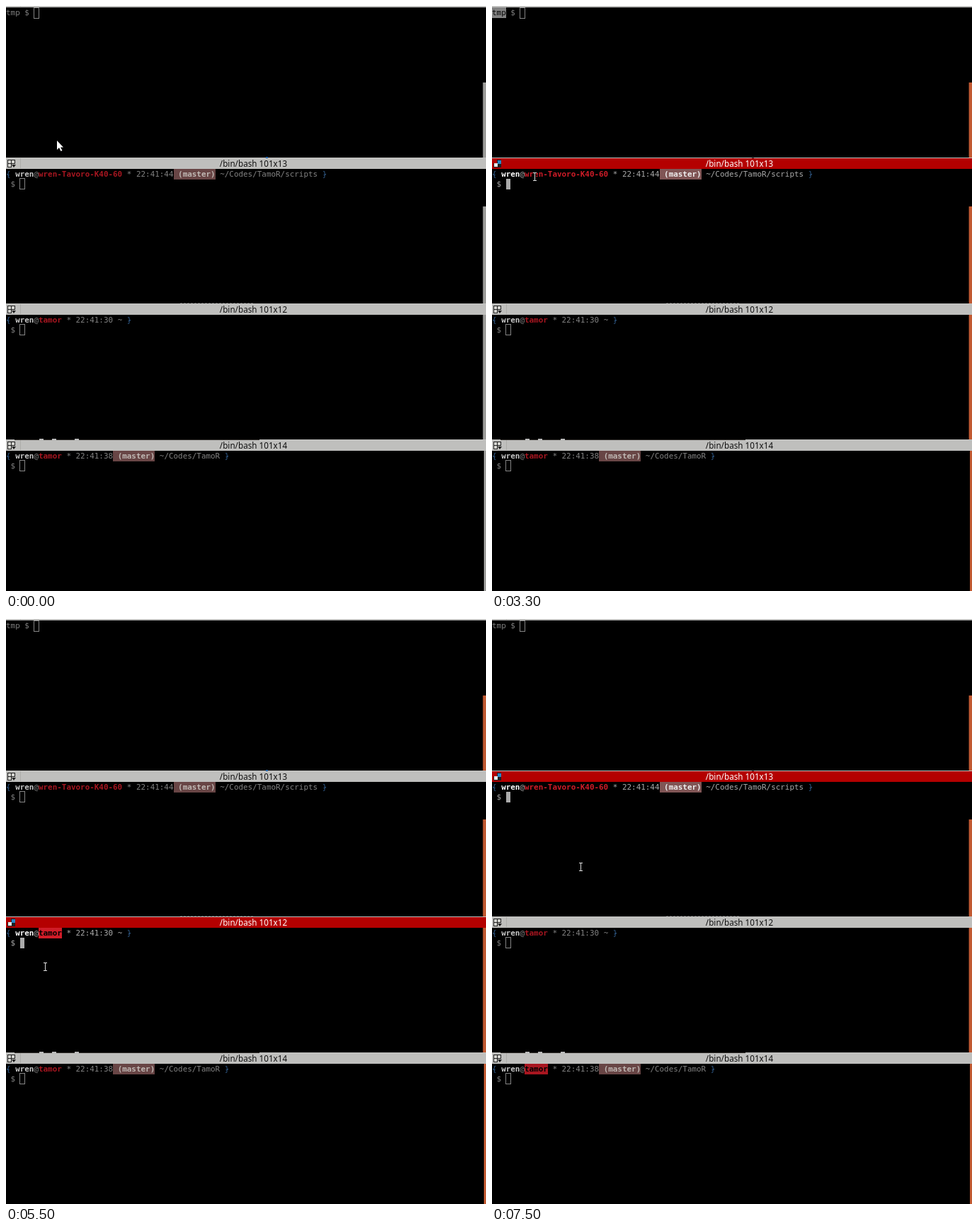
Animation of 678 by 826 pixels, one loop 8 s. Source, as an HTML page with a canvas:

```html
<!DOCTYPE html>
<html lang="en">
<head>
<meta charset="utf-8">
<title>Split terminal</title>
<style>
  html, body { margin: 0; width: 100%; height: 100%; overflow: hidden; background: #000; }
  canvas { display: block; }
</style>
</head>
<body>
<canvas id="stage" width="678" height="826"></canvas>
<script>
const ctx = document.getElementById('stage').getContext('2d');
const WIDTH = 678, HEIGHT = 826, LOOP = 8000, STEP = 100;
const CHAR = 6.57, CELL = 15, BLINK = 650, TRAVEL = 400;
const MONO = '10.91px "DejaVu Sans Mono", monospace';
const TITLE = '11.7px "Noto Sans", "Open Sans", sans-serif';

const panes = [
  { top: -13, thumb: 108, size: '101x14' },
  { top: 215, thumb: 283, size: '101x13', host: 'wren-Tavoro-K40-60', clock: '22:41:44', git: true, path: '~/Codes/TamoR/scripts' },
  { top: 421, thumb: 436, size: '101x12', host: 'tamor', clock: '22:41:30', path: '~' },
  { top: 613, thumb: 628, size: '101x14', host: 'tamor', clock: '22:41:38', git: true, path: '~/Codes/TamoR' },
];

// A click focuses a pane; a word is selected there after the given delay
const clicks = [
  { at: 1500, pane: 0, delay: 0 },
  { at: 3200, pane: 1, delay: 400 },
  { at: 5100, pane: 2, delay: 400 },
  { at: 6300, pane: 3, delay: 400 },
  { at: 7400, pane: 1, delay: Infinity },
];

// Where the pointer rests: [arrival time, x, y]
const stops = [
  [0, 73, 197], [400, 27, 88], [1000, 14, 10], [2100, 41, 298], [2800, 60, 241],
  [4200, 22, 466], [4700, 56, 442], [5800, 53, 639], [7200, 125, 350],
];

function rect(color, x, y, w, h) {
  ctx.fillStyle = color;
  ctx.fillRect(x, y, w, h);
}

function write(text, col, y, color, bold) {
  ctx.font = (bold ? 'bold ' : '') + MONO;
  ctx.fillStyle = color;
  ctx.fillText(text, col * CHAR, y);
}

function highlight(color, col, length, y) {
  const x = Math.round(col * CHAR);
  rect(color, x, y, Math.round((col + length) * CHAR) - x, CELL);
}

function drawIcon(y, active) {
  if (active) {
    rect('#202020', 2, y + 2, 11, 11);
    rect('#b40000', 2, y + 2, 5, 5);
    rect('#e8e8e8', 3, y + 7, 5, 5);
    rect('#2b86c5', 8, y + 3, 5, 5);
    return;
  }
  rect('#adada9', 20, y, 1, 14);
  rect('#222', 2, y + 2, 11, 11);
  for (const [dx, dy] of [[3, 3], [8, 3], [3, 8]]) rect('#d4d4d0', dx, y + dy, 4, 4);
  rect('#bebebb', 8, y + 8, 5, 5);
  ctx.fillStyle = '#222';
  ctx.beginPath();
  ctx.moveTo(8, y + 9);
  ctx.lineTo(14, y + 9);
  ctx.lineTo(11, y + 13);
  ctx.fill();
}

function drawTitle({ top, size }, active) {
  rect('#c4c4c2', 0, top - 1, WIDTH, 1);
  rect(active ? '#b40000' : '#bfbfbd', 0, top, WIDTH, CELL);
  drawIcon(top, active);
  ctx.font = TITLE;
  ctx.textAlign = 'center';
  ctx.fillStyle = active ? '#fff' : '#111';
  ctx.fillText('/bin/bash ' + size, 349.5, top + 12);
  ctx.textAlign = 'left';
}

function drawCursor(col, y, active, visible) {
  const x = Math.ceil(col * CHAR);
  if (!active) {
    ctx.strokeStyle = '#858585';
    ctx.strokeRect(x - .5, y - .5, 7, CELL);
  } else if (visible) {
    rect('#aaa', x, y, 6, CELL);
  }
}

function drawBracket(shape, col, y) {
  for (const glyph of [shape, '-']) write(glyph, col, y, '#2f5a88');
}

function drawPrompt({ top, host, clock, git, path }, active, selected) {
  const y = top + 26, row = top + 15;
  const plain = active ? '#aaa' : '#828282';
  const red = active ? '#d01c28' : '#a81620';
  let col = 7;
  drawBracket('{', 0, y);
  write('wren', 2, y, active ? '#fff' : '#c8c8c8', true);
  write('@', 6, y, plain);
  if (selected) highlight(red, col, host.length, row);
  write(host, col, y, selected ? '#000' : red, true);
  col += host.length;
  write(' * ' + clock, col, y, plain);
  col += 11;
  if (git) {
    highlight(active ? '#805555' : '#684545', col, 9, row);
    write(' (master)', col, y, active ? '#eee' : '#c0b8b4', true);
    col += 9;
  }
  write(path, col + 1, y, plain);
  drawBracket('}', col + path.length + 2, y);
  write('$', 1, y + 14, plain);
}

function drawShell(active, selected) {
  const plain = active ? '#aaa' : '#828282';
  if (selected) highlight(plain, 0, 3, 2);
  write('tmp', 0, 13, selected ? '#000' : plain);
  write('$', 4, 13, plain);
}

// Slivers of the windows behind the pane edges
function drawEdges(focus) {
  rect(focus === 1 ? '#333' : '#286cb5', 367, 213, 3, 2);
  for (let x = 246; x < 350; x += 5) rect('#4a4a4a', x, 419, 3, 1);
  rect('#33302c', 12, 612, 346, 1);
  for (const x of [47, 65, 97]) rect('#bbb', x, 611, 6, 2);
}

function pointerAt(t) {
  const i = stops.findLastIndex(([arrival]) => t >= arrival - TRAVEL);
  const [arrival, x, y] = stops[i], [, x0, y0] = stops[Math.max(i - 1, 0)];
  const k = Math.min(1, 1 - (arrival - t) / TRAVEL);
  return [Math.round(x0 + (x - x0) * k), Math.round(y0 + (y - y0) * k)];
}

function drawPointer(t) {
  const [x, y] = pointerAt(t);
  if (t < 200) {
    ctx.save();
    ctx.translate(x - 1, y - 7);
    ctx.fillStyle = '#fff';
    ctx.fill(new Path2D('M0 0V13L3 10L5.5 15L7.5 14L5 9.5H9Z'));
    ctx.restore();
    return;
  }
  rect('#000', x - 1, y - 5, 3, 11);
  rect('#ddd', x, y - 5, 1, 11);
  rect('#ddd', x - 2, y - 6, 5, 1);
  rect('#ddd', x - 2, y + 5, 5, 1);
}

function draw(t) {
  const click = clicks.findLast(c => t >= c.at);
  // The old selection is dropped halfway through the delay
  const picked = clicks.findLast(c => t >= c.at + c.delay / 2);
  const selection = picked && t >= picked.at + picked.delay ? picked.pane : -1;
  const focus = click ? click.pane : -1;
  const cursorOn = click && (t - click.at) % (2 * BLINK) < BLINK;

  rect('#000', 0, 0, WIDTH, HEIGHT);
  panes.forEach((pane, i) => {
    const active = i === focus, selected = i === selection;
    drawTitle(pane, active);
    if (pane.host) drawPrompt(pane, active, selected);
    else drawShell(active, selected);
    drawCursor(pane.host ? 3 : 6, pane.top + (pane.host ? 29 : 16), active, cursorOn);
    const next = panes[i + 1];
    const x = next ? 673.6 : 675;
    const bottom = next ? next.top - 1 : HEIGHT;
    rect(click ? '#c15a32' : '#9c9c9a', x, pane.thumb, WIDTH - x, bottom - pane.thumb);
  });
  drawEdges(focus);
  drawPointer(t);
}

function frame() {
  const t = performance.now() % LOOP;
  draw(Math.floor(t / STEP) * STEP);
  requestAnimationFrame(frame);
}
frame();
</script>
</body>
</html>
```
